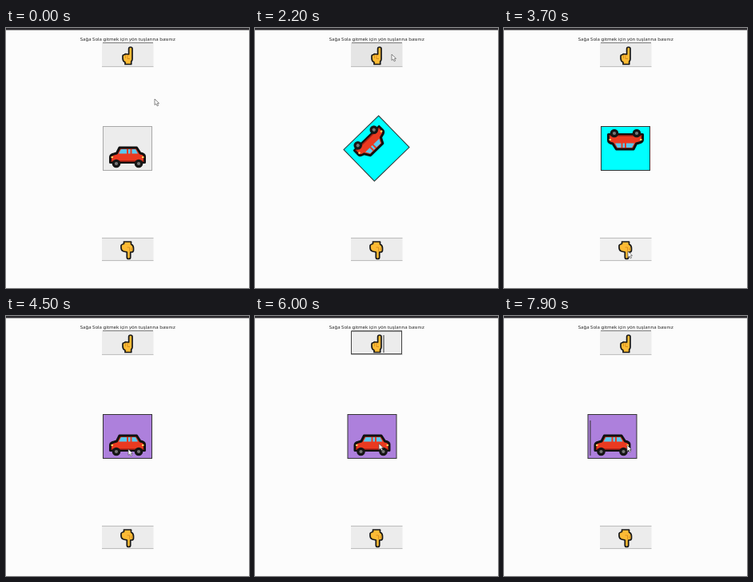
Write an HTML page that moves like this. It is 304 by 326 pixels and loops after 8000 ms.

```html
<!DOCTYPE html>
<html lang="tr">
<head>
<meta charset="utf-8">
<style>
html, body { margin: 0; width: 100%; height: 100%; overflow: hidden; background: #fcfcfc; }
svg { display: block; width: 100vw; height: 100vh; }
text { font: 6px "Noto Sans", "Open Sans", sans-serif; fill: #222; }
.hand { fill: #fdbb35; stroke: #171717; stroke-width: 1.7; stroke-linejoin: round; }
.fold { fill: none; stroke: #c9821c; stroke-width: .7; }
.caret { stroke: #333; stroke-width: 1; }
</style>
</head>
<body>
<svg viewBox="0 0 304 326">
  <rect width="304" height="326" fill="#fcfcfc"/>
  <rect width="304" height="2.6" fill="#2b2a2e"/>
  <text x="152.3" y="16" text-anchor="middle">Sağa Sola gitmek için yön tuşlarına basınız</text>

  <rect id="up" x="120" y="19" width="64.5" height="29.5"/>
  <path d="M121 18.6H184" stroke="#666" stroke-width=".9"/>
  <path d="M120 48.4H184.5" stroke="#bbb"/>
  <path class="hand" d="M153.600 33V26Q153.600 24 155.800 24T158 26V39Q158 41 156.700 42V45.500H149V43Q146 41.500 146 38V35.500Q146 33.500 148 33.500L149.500 32.500Z"/>
  <path class="fold" d="M149.500 34V38M152 33.500V38.500H155"/>
  <g id="focus">
    <rect x="120.500" y="19" width="63" height="28.500" fill="none" stroke="#444"/>
    <path class="caret" d="M161 24V46"/>
  </g>

  <rect id="down" x="120" y="263" width="64.5" height="29"/>
  <path d="M120 263.400H184.500M120 291.600H184.500" stroke="#b4b4b4" stroke-width=".9"/>
  <path class="hand" d="M147.500 268H156.500V271Q159.500 272.500 159.500 276V278.500Q159.500 281 157 281H155.700V287.500Q155.700 289.500 153.500 289.500T151.300 287.500V281L147 280Q144 279 144 275.500V273Q144 271.500 147.500 270.500Z"/>
  <path class="fold" d="M157 279V275.500M154.500 280V275H151.500"/>

  <g id="box">
    <rect id="panel" x="-30.500" y="-27.500" width="61" height="55"/>
    <path d="M-21.500 17.500V11Q-21.500 8 -17 7L-13.500 6L-10 -1H11.500L16 6Q21.500 7 21.500 10V17.500Z" fill="#ea3a20" stroke="#111" stroke-width="3" stroke-linejoin="round"/>
    <path d="M-11 6.500L-8 1H-1V6.500ZM1 6.500V1H3.500V6.500ZM5.500 6.500V1H10L13 6.500Z" fill="#5ac8ee"/>
    <path d="M-20.500 16H20.500" stroke="#a51d12" stroke-width="1.500"/>
    <path d="M-20.500 11H-18M18 11H20.500" stroke="#ffd25c" stroke-width="2"/>
    <g fill="#777" stroke="#161616" stroke-width="3.200">
      <circle cx="-14" cy="19" r="3.700"/><circle cx="14" cy="19" r="3.700"/>
    </g>
    <path id="boxCaret" class="caret" d="M-27.500 -20V24"/>
  </g>

  <path id="cursor" d="M0 0V7.500L1.800 6L3.200 8.800L4.600 8.100L3.300 5.500L5.500 5.300Z" fill="#fff" stroke="#555" stroke-width=".7"/>
</svg>
<script>
const LOOP = 8000, STEP = 5.5;
const $ = id => document.getElementById(id);
const set = (id, name, value) => $(id).setAttribute(name, value);
const show = (id, on) => set(id, 'visibility', on ? 'visible' : 'hidden');
const clamp = v => Math.max(0, Math.min(1, v));

// [time, x, y] of the pointer tip
const path = [
  [0, 186, 89], [750, 186, 89], [1300, 171, 32], [2200, 171, 33], [2500, 184, 40],
  [2750, 192, 110], [3000, 180, 220], [3200, 160, 278], [3400, 155, 280], [3850, 155, 280],
  [4400, 153, 167], [4500, 153, 167], [4850, 162, 181], [5200, 157, 165], [5500, 155, 160],
  [7500, 155, 160], [7900, 154, 162], [8000, 154, 162]
];
const presses = [5750, 6150, 6450];

function pointer(t) {
  const i = path.findIndex(p => p[0] > t);
  const [t0, x0, y0] = path[i - 1], [t1, x1, y1] = path[i];
  const u = (t - t0) / (t1 - t0), k = u * u * (3 - 2 * u);
  return [x0 + (x1 - x0) * k, y0 + (y1 - y0) * k];
}

// cubic-bezier(.25, .1, .25, 1)
function ease(x) {
  let lo = 0, hi = 1;
  const bez = (a, b, s) => 3 * a * s * (1 - s) ** 2 + 3 * b * s * s * (1 - s) + s ** 3;
  for (let i = 0; i < 20; i++) {
    const mid = (lo + hi) / 2;
    if (bez(.25, .25, mid) < x) lo = mid; else hi = mid;
  }
  return bez(.1, 1, lo);
}

function draw(t) {
  const [x, y] = pointer(t);
  const turned = t >= 1450 && t < 3900, purple = t >= 3900;
  const angle = turned ? 180 * ease(clamp((t - 1450) / 1650)) : 0;
  const shift = STEP * presses.filter(p => t >= p).length;
  const over = top => x > 120 && x < 185 && y > top && y < top + 29;

  set('cursor', 'transform', `translate(${x} ${y})`);
  set('up', 'fill', over(19) ? '#e5e5e5' : '#ececec');
  set('down', 'fill', over(263) ? '#f0f0f0' : '#ececec');
  set('box', 'transform', `translate(${152 - shift} 151) rotate(${angle})`);
  set('panel', 'fill', purple ? '#ad80dc' : turned ? '#00ffff' : '#ececec');
  set('panel', 'stroke', purple || turned ? '#333' : '#a8a8a8');
  show('focus', t >= 5900 && t < 6500);
  show('boxCaret', t >= 6600);
}

function tick(now) {
  draw(now % LOOP);
  requestAnimationFrame(tick);
}
requestAnimationFrame(tick);
</script>
</body>
</html>
```
